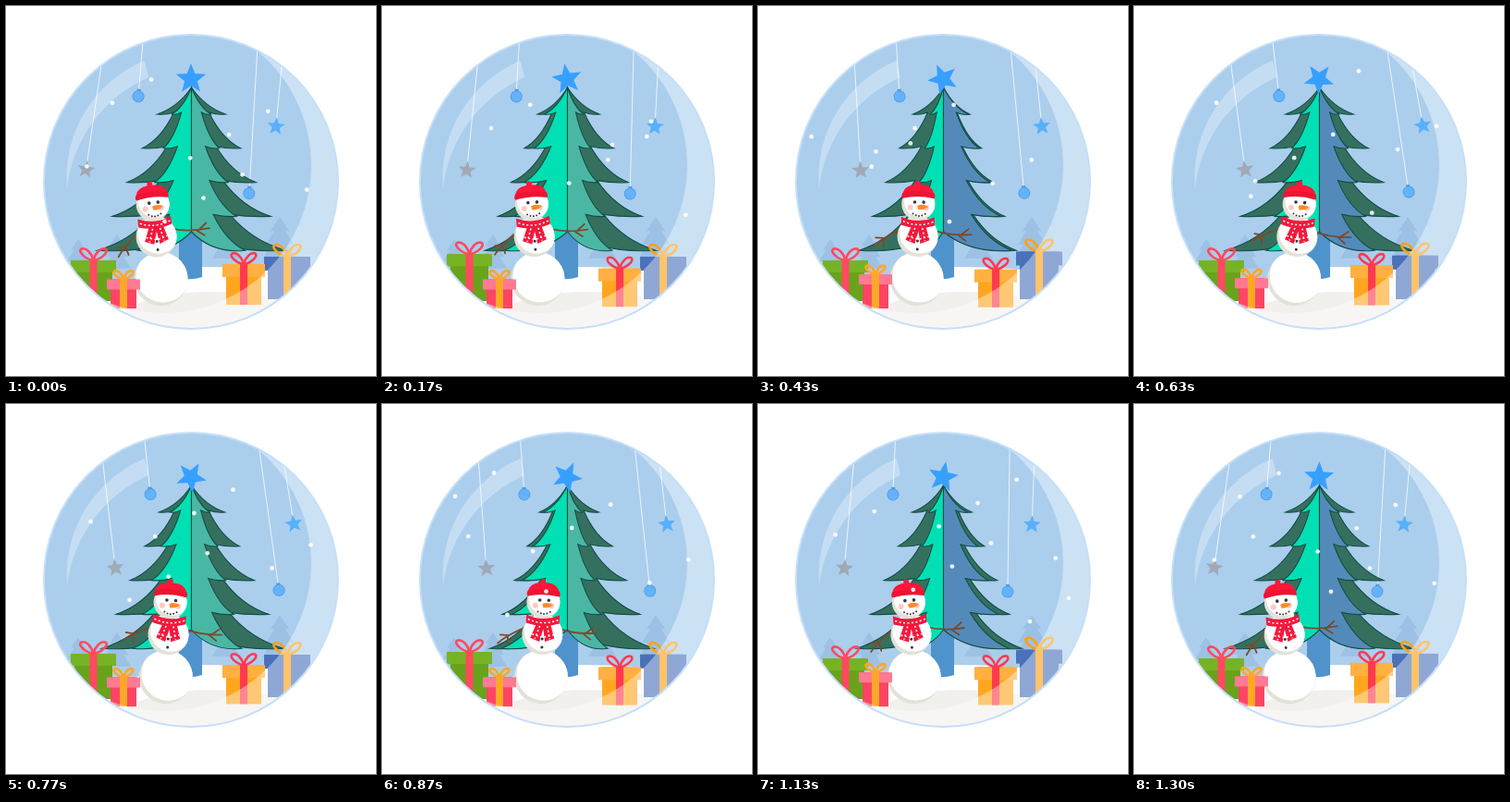
These frames come from a looping animation (400 px wide and 400 px high, 1330 ms). An HTML page with a canvas:

```html
<!DOCTYPE html>
<html lang="en">
<head>
<meta charset="utf-8">
<title>Snow globe</title>
<style>
html, body { margin: 0; width: 100%; height: 100%; overflow: hidden; background: #fff; }
canvas { display: block; width: 400px; height: 400px; }
</style>
</head>
<body>
<canvas width="400" height="400"></canvas>
<script>
const LOOP = 1330, SPIN = LOOP / 2, { PI, sin, cos, max, sqrt } = Math, RAD = PI / 180;
const ctx = document.querySelector('canvas').getContext('2d');
const mix = (a, b, k) => a + (b - a) * k;

function paint(path, fill, stroke, width = 1) {
  if (typeof path === 'string') path = new Path2D(path);
  if (fill) { ctx.fillStyle = fill; ctx.fill(path); }
  if (stroke) { ctx.strokeStyle = stroke; ctx.lineWidth = width; ctx.stroke(path); }
}
function placed(path, x, y, sx, sy = sx) {
  const copy = new Path2D();
  copy.addPath(path, new DOMMatrix([sx, 0, 0, sy, x, y]));
  return copy;
}
function oval(x, y, rx, fill, ry = rx) {
  ctx.beginPath();
  ctx.ellipse(x, y, rx, ry, 0, 0, 2 * PI);
  ctx.fillStyle = fill;
  ctx.fill();
}
function box(x, y, w, h, fill) {
  ctx.fillStyle = fill;
  ctx.fillRect(x, y, w, h);
}
function turned(x, y, degrees, draw) {
  ctx.save();
  ctx.translate(x, y);
  ctx.rotate(degrees * RAD);
  ctx.translate(-x, -y);
  draw();
  ctx.restore();
}
function star(x, y, r, degrees, fill) {
  ctx.beginPath();
  for (let i = 0; i < 10; i++) {
    const a = (degrees + i * 36 - 90) * RAD, d = i % 2 ? r * .43 : r;
    ctx.lineTo(x + d * cos(a), y + d * sin(a));
  }
  ctx.closePath();
  ctx.fillStyle = fill;
  ctx.fill();
}

const globe = new Path2D();
globe.arc(200, 190, 159, 0, 2 * PI);
const sheen = new Path2D(globe);
sheen.moveTo(330, 172);
sheen.arc(170, 172, 160, 0, 2 * PI);

// Half of the tree, measured from its trunk axis
function makeBranches() {
  const path = new Path2D('M0 88');
  let x = 0, y = 88;
  for (let i = 0; i < 5; i++) {
    const tipX = 37 + 16.2 * i, tipY = 117 + 36.8 * i;
    path.quadraticCurveTo(mix(x, tipX, .4), mix(y, tipY, .74), tipX, tipY);
    x = 19 + 7.5 * i;
    y = tipY - 2;
    if (i < 4) path.quadraticCurveTo(mix(x, tipX, .5), tipY + 1, x, y);
  }
  path.quadraticCurveTo(40, 268, 0, 244);
  path.closePath();
  return path;
}
const branches = makeBranches();

// The panels turn around the axis; each side runs the same course, mirrored in time
function treeSide(dir, p, front) {
  const panel = (width, fill) => paint(placed(branches, 200.5, 0, dir * width, 1), fill, '#124f47', 1.1);
  const sweep = cos(55 * RAD * (1 - p ** 1.5)), late = p >= .5;
  panel(late ? sweep : cos(112 * RAD * p), '#35705f');
  panel(late ? .57 * sqrt(sin(PI * (p - .5))) : sweep, front);
}
function tree(p, turn) {
  paint('M187 240H212V293Q200 297 187 294Z', '#4f93cc');
  treeSide(-1, p, '#00e0b4');
  treeSide(1, 1 - p, p < .5 ? '#4ab7a5' : '#548aba');
  star(200, 79, 17, -72 * turn, '#37a0ff');
}

function hang(x, y, length, angle, kind) {
  turned(x, y, angle, () => {
    const end = y + length;
    paint(`M${x} ${y - 20}V${end - 7}`, null, 'rgba(255,255,255,.75)');
    if (kind === 'ball') {
      box(x - 2, end - 8, 4, 3, '#4d9be0');
      oval(x, end, 6.5, '#4d9be0');
      oval(x, end, 5.7, '#64b3fa');
    } else star(x, end, 10, 0, kind);
  });
}
function ornaments(sway) {
  hang(104, 57, 121, .3 - 8 * sway, '#a0a9b5');
  hang(148.8, 29, 69, -1 - 5.8 * sway, 'ball');
  hang(299, 55, 75.5, -2.4 - 7.8 * sway, '#58b0fb');
  hang(272.3, 38, 165, -2.7 - 6 * -sway * -1, 'ball');
}

const loop = new Path2D('M0 0C2 -8 8 -14 13 -12C17 -9 8 -1 0 0');

function gift(x, width, top, bottom, lidHeight, lid, body, ribbon) {
  const mid = x + width / 2, s = width / 48;
  box(x + 4, top, width - 8, bottom - top, body);
  box(x, top, width, lidHeight, lid);
  box(mid - 4, top, 8, bottom - top, ribbon);
  for (const d of [-s, s]) paint(placed(loop, mid, top, d, s), null, ribbon, 2.6);
}
const lateHop = p => 5.5 * max(0, sin(PI * (p - .3) / .7));
function gifts(p) {
  const squash = sin(PI * p);
  gift(70, 49, 275 - 7 * max(0, sin(PI * p / .62)), 319, 13, '#76b324', '#69a31c', '#ff4a5f');
  gift(279, 50, 271 - lateHop(p), 317, 15, '#4a71ba', '#4a71ba', '#ffa010');
  gift(234, 46, 279 + 6.5 * squash, 323 + 3 * squash, 14, '#ffb041', '#ffa61f', '#ff3a50');
}

function snowBall(x, y, r) {
  oval(x, y, r, '#e3e2d8');
  ctx.save();
  ctx.beginPath();
  ctx.arc(x, y, r, 0, 2 * PI);
  ctx.clip();
  oval(x + 2.5, y - 3.5, r, '#fff');
  ctx.restore();
}
function snowman(k) {
  const wood = '#7b4a2b', red = '#f5183c', dark = '#333842';
  turned(171.2, 326, mix(-6.3, 4, k), () => {
    ctx.lineCap = 'round';
    turned(154, 241, mix(-16, 0, k), () =>
      paint('M156 241Q140 246 126 255M134 250L125 249M133 251V260M126 255L122 258', null, wood, 1.8));
    paint('M188 242Q206 248 229 246M217 247L226 240M215 247L223 253', null, wood, 1.8);
    ctx.lineCap = 'butt';
    snowBall(171, 295, 29);
    snowBall(171, 249, 22);
    snowBall(171, 214, 18);
    // Scarf
    paint('M153 228Q171 236 189 228V237Q171 243 153 237Z', red);
    paint('M165 236L173 239L168 257L158 253ZM171 238L179 236L184 253L174 257Z', red);
    ctx.setLineDash([2, 2.5]);
    paint('M155 233Q171 240 188 233M168 240L163 254M176 240L179 254M160 249L170 252M173 252L183 249',
      null, '#fff', 1.5);
    ctx.setLineDash([]);
    for (const y of [254, 263]) oval(171, y, 1.5, dark);
    // Face
    for (const d of [-1, 1]) {
      oval(171 + d * 8.5, 218, 3, '#ffc9c5');
      oval(172 + d * 4.8, 212, 1.8, dark);
    }
    paint('M170 216Q176 213 182 217Q176 221 171 220Z', '#ff8a28');
    for (let i = -2; i <= 2; i++) oval(172 + i * 3.3, 227 - i * i * .6, 1, dark);
    // Hat
    oval(170, 192, 3, '#ff1739');
    paint('M154 207Q153 193 171 193Q189 193 188 207Q171 203 154 207Z', '#ff1739');
    paint('M154 202Q171 198 188 202Q190 206 188 208Q171 204 154 208Q152 206 154 202Z', '#f01232');
  });
}

// Flakes start in turn, each from its own scattered place
function snow(t) {
  const scatter = n => n * .618034 % 1;
  for (let i = 0; i < 20; i++) {
    const age = (t + LOOP - i * LOOP / 20) % LOOP;
    if (age > 500 + 350 * scatter(i * 5)) continue;
    const x = 50 + 280 * scatter(i * 3), y = 45 + 110 * scatter(i * 7 + .4);
    oval(x + .018 * age, y + .16 * age, 2.4, 'rgba(255,255,255,.88)');
  }
}

const fir = new Path2D('M0 0L10 15H6L15 30H9L19 46H-19L-9 30H-15L-6 15H-10Z');
function scenery() {
  paint(globe, '#abceed');
  for (const [x, y, s] of [[296, 228, 1], [238, 236, .8], [78, 252, .8], [120, 247, .8]])
    paint(placed(fir, x, y, s), '#9dc1e5');
  paint('M30 322Q80 312 120 303Q170 282 215 282Q270 282 330 290L370 400H30Z', '#fff');
  paint('M132 326Q170 309 220 309Q270 309 310 320L300 352H120Z', '#f1f0ed');
}

function draw(t) {
  const turn = t / LOOP, sway = -cos(2 * PI * turn), k = (1 + sway) / 2, p = t % SPIN / SPIN;
  ctx.clearRect(0, 0, 400, 400);
  ctx.save();
  ctx.clip(globe);
  scenery();
  ornaments(sway);
  tree(p, turn);
  gifts(p);
  snowman(k);
  gift(109, 36, 295.5 - lateHop(p), 327, 11, '#ff7a92', '#ff4564', '#ffa726');
  snow(t);
  ctx.fillStyle = 'rgba(255,255,255,.38)';
  ctx.fill(sheen, 'evenodd');
  paint('M66 197A137 137 0 0 1 150 59L154 77A150 150 0 0 0 66 197Z', 'rgba(255,255,255,.3)');
  ctx.restore();
  paint(globe, null, '#c6dff8', 2);
}
function tick() {
  draw(performance.now() % LOOP);
  requestAnimationFrame(tick);
}
tick();
</script>
</body>
</html>
```
